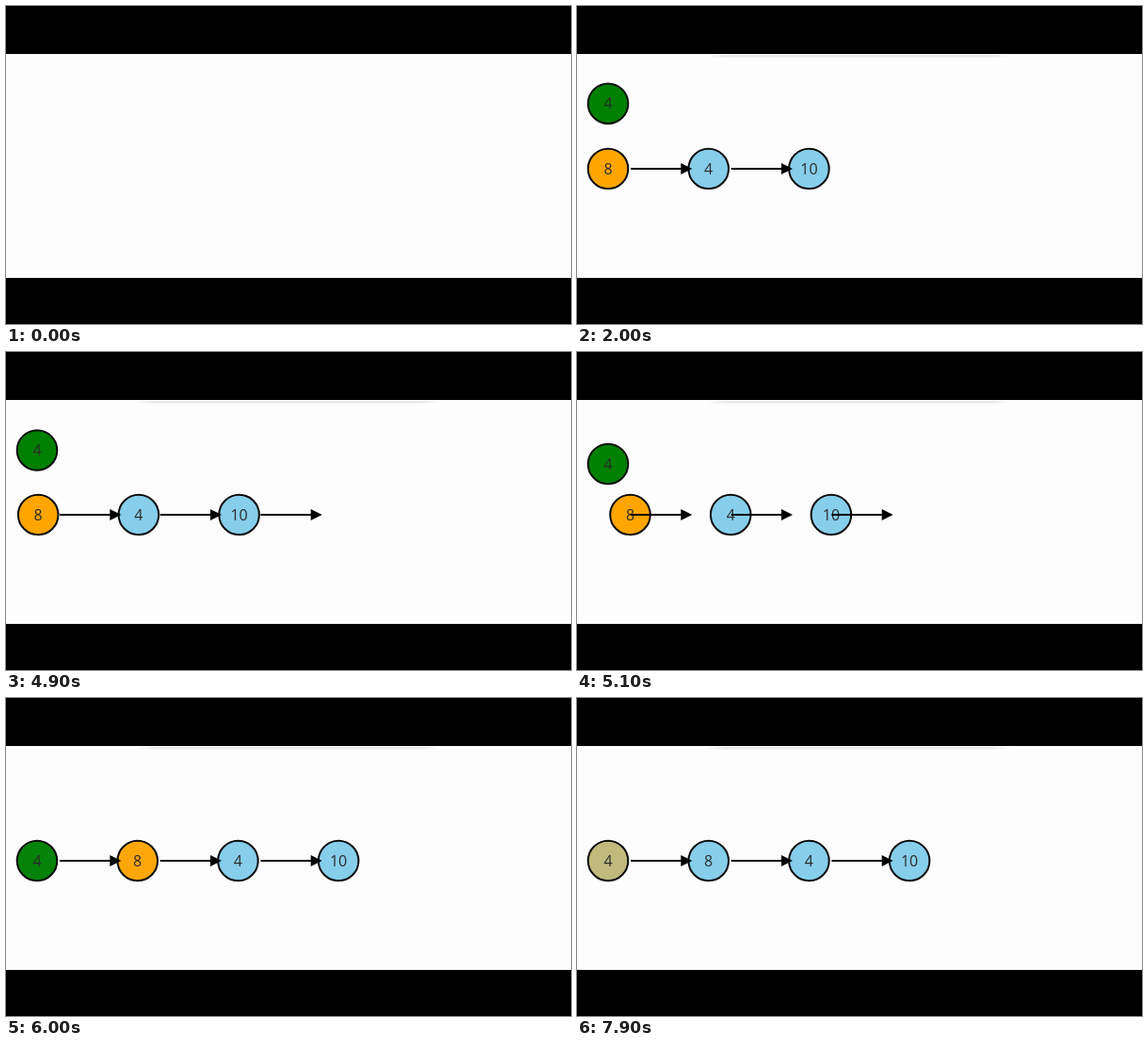
An HTML page for the animation above (8000 ms loop, 600 by 338 pixels).

```html
<!DOCTYPE html>
<html lang="en">
<head>
<meta charset="utf-8">
<title>Linked list: insert at head</title>
<style>
  html, body { margin: 0; width: 100%; height: 100%; overflow: hidden; background: #000; }
  svg { display: block; width: 600px; height: 338px; }
  .node circle { stroke: #0a0a0a; stroke-width: 2; }
  text { font: 16px "Open Sans", "Noto Sans", sans-serif; fill: #2b2b2b; text-anchor: middle; }
  .arrow line { stroke: #000; stroke-width: 2; }
</style>
</head>
<body>
<svg id="stage" viewBox="0 0 600 338">
  <defs>
    <linearGradient id="fade">
      <stop offset="0" stop-color="#e9e9ea" stop-opacity="0"/>
      <stop offset=".06" stop-color="#e9e9ea"/>
      <stop offset=".94" stop-color="#e9e9ea"/>
      <stop offset="1" stop-color="#e9e9ea" stop-opacity="0"/>
    </linearGradient>
  </defs>
  <rect width="600" height="338"/>
  <rect y="51" width="600" height="238" fill="#fdfdfe"/>
  <rect id="shade" x="138" y="52" width="322" height="2.5" fill="url(#fade)"/>
</svg>
<script>
const LOOP = 8000, STEP = 100;
const X0 = 33, GAP = 106.7, ROW = 173, TOP = 103.7;
const SKY = [135, 206, 235], ORANGE = [255, 165, 0], GREEN = [0, 128, 0];
const stage = document.getElementById("stage");
const shade = document.getElementById("shade");

function add(parent, tag, attrs) {
  const el = document.createElementNS("http://www.w3.org/2000/svg", tag);
  for (const key in attrs) el.setAttribute(key, attrs[key]);
  return parent.appendChild(el);
}

function makeNode(label) {
  const g = add(stage, "g", { class: "node" });
  const disc = add(g, "circle", { r: 21.3 });
  add(g, "text", { y: 5.7 }).textContent = label;
  return { g, disc };
}

// An arrow points right from its origin; its length is set per frame.
function makeArrow() {
  const g = add(stage, "g", { class: "arrow" });
  const line = add(g, "line", {});
  const head = add(g, "path", { d: "M-12-6L0 0L-12 6Z" });
  return { g, line, head };
}

const fresh = makeNode("4");
const list = ["8", "4", "10"].map(makeNode);
const links = [0, 1, 2].map(makeArrow);
const down = makeArrow();

const show = (el, on) => { el.style.display = on ? "" : "none"; };
const progress = (t, from, to) => Math.min(1, Math.max(0, (t - from) / (to - from)));
const lerp = (a, b, k) => a + (b - a) * k;
const mix = (a, b, k) => `rgb(${a.map((v, i) => Math.round(lerp(v, b[i], k)))})`;

function bezier(x1, y1, x2, y2) {
  const at = (a, b, s) => 3 * a * s * (1 - s) ** 2 + 3 * b * s * s * (1 - s) + s ** 3;
  return x => {
    let lo = 0, hi = 1;
    for (let i = 0; i < 24; i++) {
      const mid = (lo + hi) / 2;
      if (at(x1, x2, mid) < x) lo = mid; else hi = mid;
    }
    return at(y1, y2, (lo + hi) / 2);
  };
}
const ease = bezier(.25, .1, .25, 1);
const easeInOut = bezier(.42, 0, .58, 1);

function place(node, x, y, color) {
  node.g.setAttribute("transform", `translate(${x} ${y})`);
  node.disc.setAttribute("fill", color);
}

function aim(arrow, x, y, angle, length) {
  arrow.g.setAttribute("transform", `translate(${x} ${y}) rotate(${angle})`);
  arrow.line.setAttribute("x2", Math.max(0, length - 6));
  arrow.head.setAttribute("transform", `translate(${length} 0)`);
}

function draw(t) {
  const visible = t >= 1000;
  const inserting = t >= 4900;
  const move = easeInOut(progress(t, 4840, 5640));
  const reset = progress(t, 5980, 6520);

  show(shade, visible);
  list.forEach((node, i) => {
    let color = mix(SKY, SKY, 0);
    if (i === 0) {
      color = t < 5000 ? mix(SKY, ORANGE, progress(t, 950, 1900)) : mix(ORANGE, SKY, reset);
    }
    place(node, X0 + GAP * (i + move), ROW, color);
    show(node.g, visible);
  });

  const freshColor = t < 7000 ? mix(GREEN, SKY, reset) : mix(SKY, ORANGE, progress(t, 7450, 8400));
  place(fresh, X0, lerp(TOP, ROW, move), freshColor);
  show(fresh.g, t >= 1900);

  links.forEach((link, i) => {
    aim(link, X0 + 24 + GAP * i, ROW, 0, 65.3);
    show(link.g, visible && (i < 2 || inserting));
  });

  aim(down, X0, 127, 90, 28.5 * ease(progress(t, 2950, 3950)));
  show(down.g, t >= 3000 && !inserting);
}

const start = performance.now();
function tick() {
  const t = (performance.now() - start) % LOOP;
  draw(Math.floor(t / STEP) * STEP);
  requestAnimationFrame(tick);
}
tick();
</script>
</body>
</html>
```
